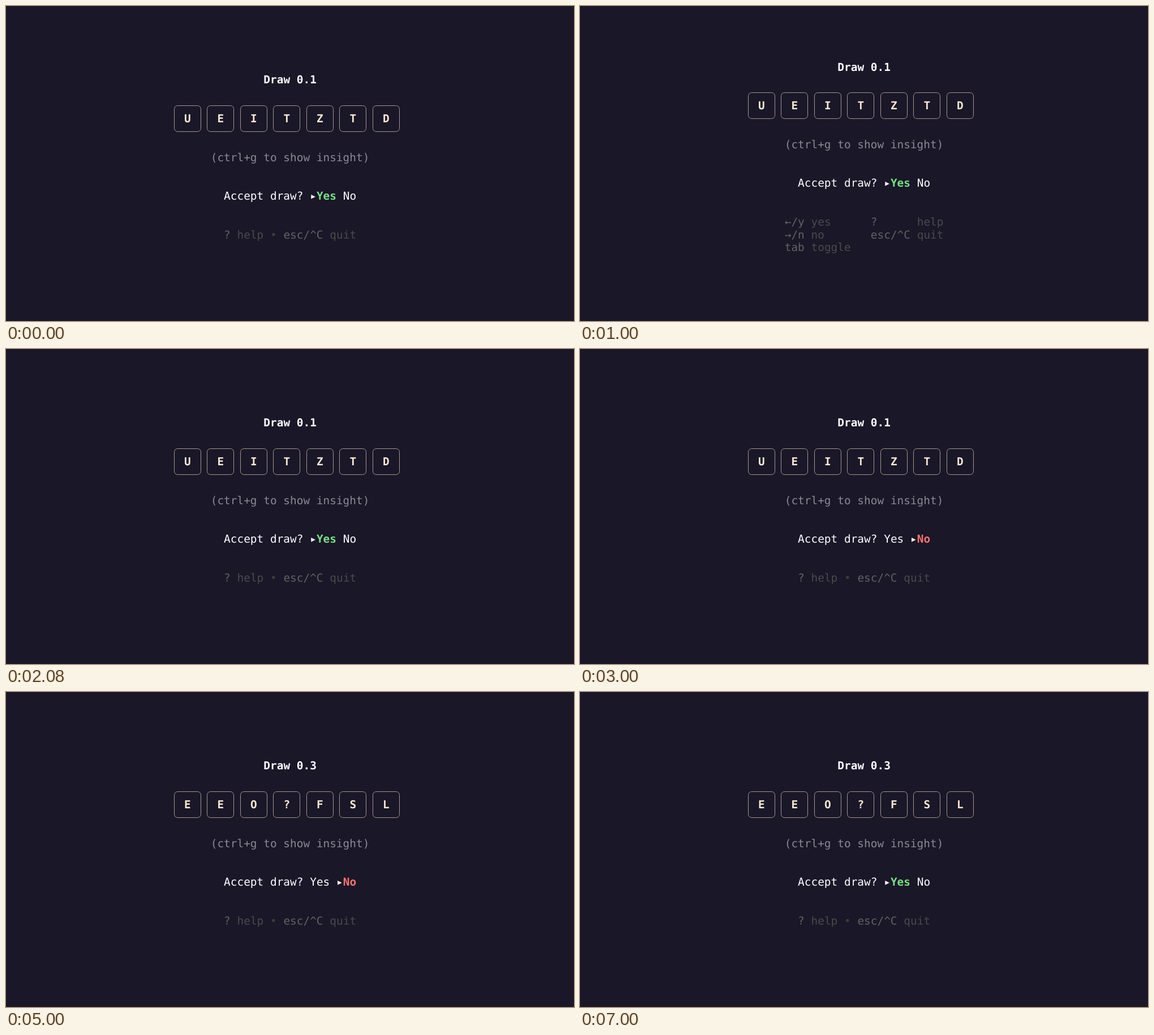
These frames come from a looping animation (1004 px wide and 558 px high, 8000 ms). An HTML page with a canvas:

```html
<!DOCTYPE html>
<html lang="en">
<head>
<meta charset="utf-8">
<title>Tile draw</title>
<style>
  html, body { margin: 0; width: 100%; height: 100%; overflow: hidden; background: #1a1728; }
  canvas { display: block; }
</style>
</head>
<body>
<canvas id="stage" width="1004" height="558"></canvas>
<script>
const ctx = document.getElementById('stage').getContext('2d');
const LOOP = 8000;
const CELL_W = 11.7, CELL_H = 22.85;
const LEFT = 291.5, TOP = 119.25; // top left corner of the title row
const FONT = '19.43px "DejaVu Sans Mono", monospace';
const COLOR = {
  bg: '#1a1728', text: '#ffffff', tile: '#fbe8d0', border: '#a4978d', hint: '#8b8992',
  yes: '#75e381', no: '#ff7369', key: '#626262', desc: '#4a4a4a', dot: '#3c3c3c'
};

const FIRST = { title: 'Draw 0.1', tiles: 'UEITZTD' };
const SECOND = { title: 'Draw 0.2', tiles: 'EAONRIT' };
const THIRD = { title: 'Draw 0.3', tiles: 'EEO?FSL' };

const SCENES = [
  { at: 0, draw: FIRST, yes: true },
  { at: 1000, draw: FIRST, yes: true, fullHelp: true },
  { at: 2000, draw: FIRST, yes: true, partial: true },
  { at: 2080, draw: FIRST, yes: true },
  { at: 3000, draw: FIRST, yes: false },
  { at: 4080, draw: SECOND, yes: false },
  { at: 5000, draw: THIRD, yes: false },
  { at: 7000, draw: THIRD, yes: true }
];

let originY = TOP;
const colX = col => LEFT + col * CELL_W;
const rowY = row => originY + row * CELL_H;

function write(text, col, row, color, bold = false) {
  ctx.font = (bold ? 'bold ' : '') + FONT;
  ctx.fillStyle = color;
  ctx.fillText(text, colX(col), rowY(row) + CELL_H / 2 + 6.75);
}

function drawTile(letter, index) {
  const snap = v => Math.floor(v) + 0.5;
  const col = index * 5;
  const x = snap(colX(col + 0.5)), y = snap(rowY(2.5));
  ctx.strokeStyle = COLOR.border;
  ctx.lineWidth = 1;
  ctx.beginPath();
  ctx.roundRect(x, y, snap(colX(col + 4.5)) - x, snap(rowY(4.5)) - y, 6);
  ctx.stroke();
  write(letter, col + 2, 3, COLOR.tile, true);
}

function drawPrompt(yes) {
  write('Accept draw?', 8, 9, COLOR.text);
  write('▸', yes ? 21 : 25, 9, COLOR.text);
  write('Yes', yes ? 22 : 21, 9, yes ? COLOR.yes : COLOR.text, yes);
  write('No', 26, 9, yes ? COLOR.text : COLOR.no, !yes);
}

function binding(key, keyCol, desc, descCol, row) {
  write(key, keyCol, row, COLOR.key);
  write(desc, descCol, row, COLOR.desc);
}

function drawHelp(full) {
  if (full) {
    binding('←/y', 6, 'yes', 10, 12);
    binding('→/n', 6, 'no', 10, 13);
    binding('tab', 6, 'toggle', 10, 14);
    binding('?', 19, 'help', 26, 12);
    binding('esc/^C', 19, 'quit', 26, 13);
  } else {
    binding('?', 8, 'help', 10, 12);
    write('•', 15, 12, COLOR.dot);
    binding('esc/^C', 17, 'quit', 24, 12);
  }
}

// Limits the screen to what the terminal has printed so far.
function clipPrinted() {
  ctx.beginPath();
  ctx.rect(0, 0, 1004, rowY(3));
  ctx.rect(0, rowY(3), colX(11), CELL_H);
  ctx.clip();
}

function render(scene) {
  ctx.fillStyle = COLOR.bg;
  ctx.fillRect(0, 0, 1004, 558);
  originY = scene.fullHelp ? TOP - CELL_H : TOP;
  ctx.save();
  ctx.textRendering = 'geometricPrecision';
  if (scene.partial) clipPrinted();
  write(scene.draw.title, 14, 0, COLOR.text, true);
  [...scene.draw.tiles].forEach(drawTile);
  write('(ctrl+g to show insight)', 6, 6, COLOR.hint);
  drawPrompt(scene.yes);
  drawHelp(scene.fullHelp);
  ctx.restore();
}

const start = performance.now();
function tick() {
  const time = (performance.now() - start) % LOOP;
  render(SCENES.findLast(scene => scene.at <= time));
  requestAnimationFrame(tick);
}
tick();
</script>
</body>
</html>
```
